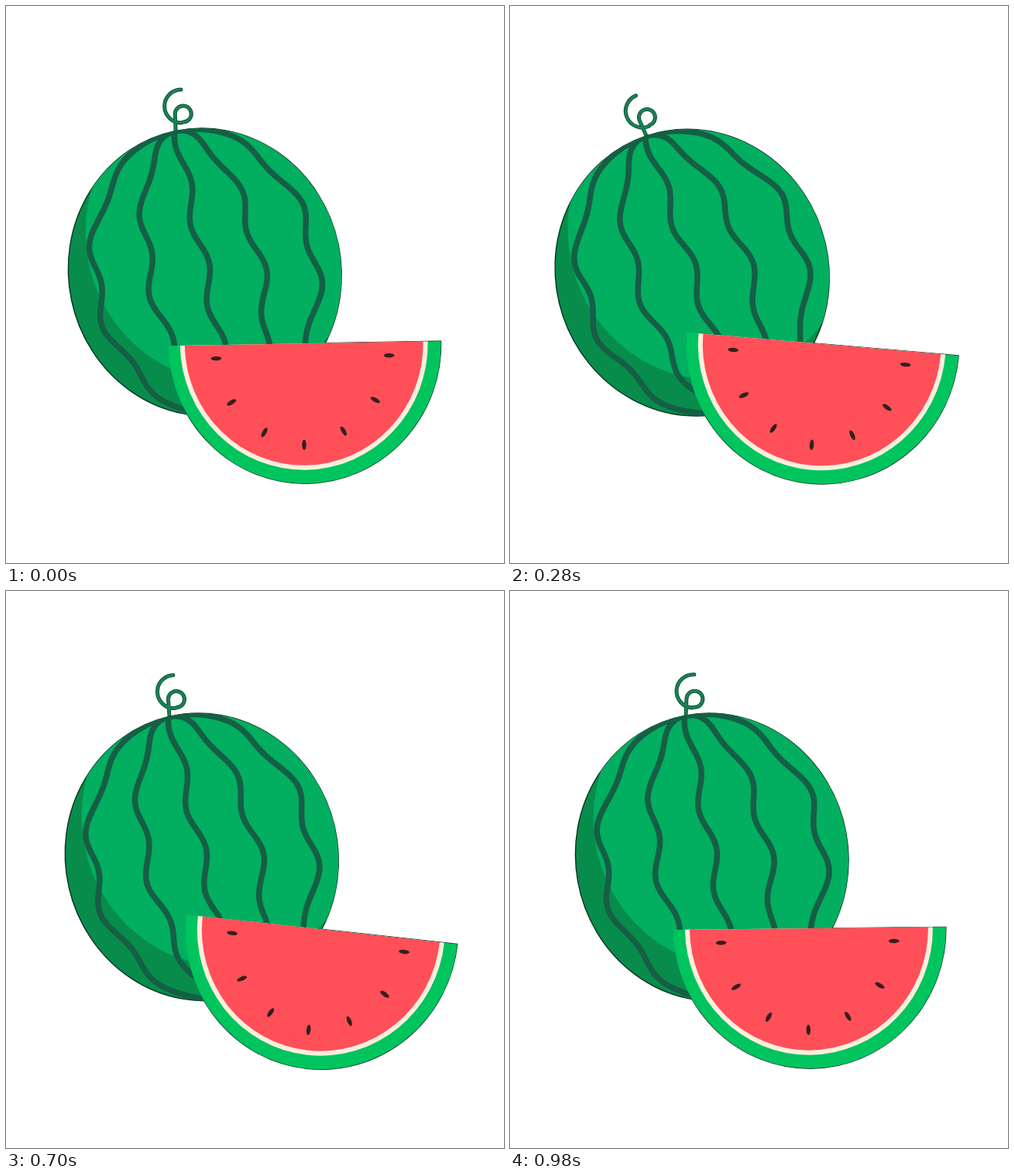
An HTML page with a canvas for the animation above (1050 ms loop, 643x720 px).

```html
<!DOCTYPE html>
<html lang="en">
<head>
<meta charset="utf-8">
<title>Rocking watermelon</title>
<style>
  html, body { margin: 0; height: 100%; overflow: hidden; background: #fff; }
  canvas { display: block; }
</style>
</head>
<body>
<canvas id="stage" width="643" height="720"></canvas>
<script>
const ctx = document.getElementById('stage').getContext('2d');
const LOOP = 1050, STEP = 70, PI = Math.PI;

const rad = deg => deg * PI / 180;

// Eased swing: at lo degrees at time tLo, at hi degrees at time tHi
function swing(t, lo, hi, tLo, tHi) {
  const u = (t - tLo + LOOP) % LOOP, rise = tHi - tLo;
  const x = u < rise ? u / rise : 1 + (u - rise) / (LOOP - rise);
  return lo + (hi - lo) * (1 - Math.cos(PI * x)) / 2;
}

function turned(x, y, deg, draw) {
  ctx.save();
  ctx.translate(x, y);
  ctx.rotate(rad(deg));
  ctx.translate(-x, -y);
  draw();
  ctx.restore();
}

// Moves the origin to x, y and tilts the axes
function placed(x, y, deg, draw) {
  ctx.save();
  ctx.translate(x, y);
  ctx.rotate(rad(deg));
  draw();
  ctx.restore();
}

function ellipse(x, y, rx, ry, color, deg = 0) {
  ctx.beginPath();
  ctx.ellipse(x, y, rx, ry, rad(deg), 0, 2 * PI);
  ctx.fillStyle = color;
  ctx.fill();
}

function stroke(width, color) {
  ctx.lineWidth = width;
  ctx.strokeStyle = color;
  ctx.stroke();
}

const outline = () => stroke(1.4, '#0b3320');

function drawCurl() {
  ctx.beginPath();
  ctx.moveTo(220.5, 162);
  ctx.arc(230.5, 139.5, 10.5, PI, 2.5 * PI);
  ctx.arc(228, 129.5, 21.5, PI / 2, 1.5 * PI);
  stroke(5, '#0f5539');
  stroke(3, '#1c8055');
}

// A meridian with a ripple that fades towards the poles
function drawStripe(bulge, crest) {
  ctx.beginPath();
  for (let a = 0; a <= PI; a += PI / 90) {
    const y = -186 * Math.cos(a), s = Math.sin(a);
    const ripple = 7 * Math.sqrt(s) * Math.cos(2 * PI * (y - crest) / 108);
    ctx.lineTo(bulge * s + ripple, y);
  }
  stroke(7.5, '#155f45');
}

function drawMelon() {
  ellipse(0, 0, 176, 186.4, '#088c4b');
  outline();
  ctx.clip();
  ellipse(36.5, -41.6, 181, 190, '#02ae5f');
  [-11, -37, -10, 14, 46].forEach((crest, i) => drawStripe(71 * (i - 2) + 1, crest));
}

function half(x, rx, ry) {
  ctx.beginPath();
  ctx.ellipse(x, 0, rx, ry, 0, 0, PI);
  ctx.closePath();
}

function outlineSlice() {
  half(0, 176, 181);
  outline();
}

function drawSlice() {
  const layer = (x, rx, ry, color) => {
    half(x, rx, ry);
    ctx.fillStyle = color;
    ctx.fill();
  };
  layer(0, 176, 181, '#00c45d');
  layer(-1, 160, 163.5, '#fbeedd');
  layer(-1, 154, 157.5, '#ff4f59');
  for (let i = -3; i <= 3; i++) {
    const n = Math.abs(i), r = 131 - 6 * n;
    const a = rad(i * (22.7 + 1.45 * n));
    ellipse(r * Math.sin(a) - 3, r * Math.cos(a), 6.8, 2.7, '#33201f', 90 - 30 * i);
  }
}

function draw(now) {
  const t = Math.floor(now / STEP) * STEP % LOOP;
  const melonTurn = swing(t, -8.4, 1.8, 420, 875);
  const curlTurn = swing(t, -25, 6, 380, 880);
  const sliceTurn = swing(t, -.1, 10, 0, 505);
  const slice = f => turned(387.5, 612, sliceTurn, () => placed(386, 436.2, -.9, f));

  ctx.clearRect(0, 0, 643, 720);
  ctx.lineCap = ctx.lineJoin = 'round';
  slice(outlineSlice);   // the melon hides its part of this line
  turned(252, 525, melonTurn, () => {
    turned(220.5, 161, curlTurn - melonTurn, drawCurl);
    placed(257.5, 344, -11.5, drawMelon);
  });
  slice(drawSlice);
}

let start;
function tick(now) {
  start ??= now;
  draw(now - start);
  requestAnimationFrame(tick);
}
draw(0);
requestAnimationFrame(tick);
</script>
</body>
</html>
```
